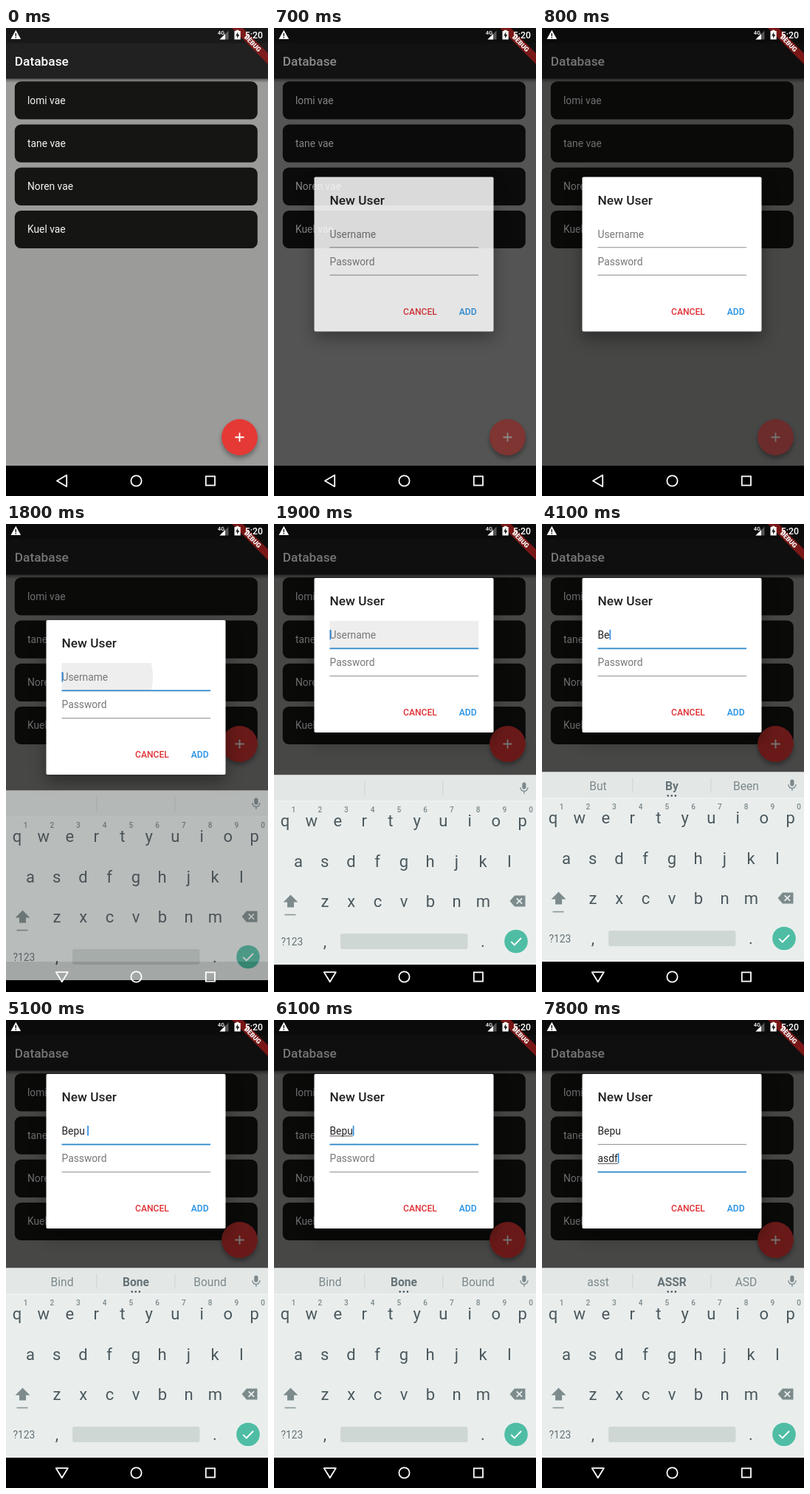
Recreate the animation shown at these times as an HTML page. Size 355 px wide and 633 px high, loop 8000 ms.

```html
<!DOCTYPE html>
<html lang="en">
<head>
<meta charset="utf-8">
<title>Add user dialog</title>
<style>
  html, body { margin: 0; width: 100%; height: 100%; overflow: hidden; background: #000; }
  svg { display: block; width: 100vw; height: 100vh; }
  text { font-family: Roboto, "Noto Sans", sans-serif; font-size: 13.8px; white-space: pre; }
  .mid { text-anchor: middle; }
  .medium { font-weight: 500; }
  .title { font-size: 17.3px; font-weight: 500; }
  .button { font-size: 12.1px; font-weight: 500; }
  .key { font-size: 22px; fill: #4b585d; text-anchor: middle; }
  .digit { font-size: 10px; font-weight: 500; fill: #7c888b; text-anchor: middle; }
  .word { font-size: 15.6px; fill: #7d898c; text-anchor: middle; }
  #fab { filter: drop-shadow(0 4px 3px rgba(0, 0, 0, .35)); }
  #card { filter: drop-shadow(0 9px 11px rgba(0, 0, 0, .38)); }
</style>
</head>
<body>
<svg viewBox="0 0 355 633">
  <defs>
    <linearGradient id="shade" x2="0" y2="1">
      <stop offset="0" stop-opacity=".45"/>
      <stop offset="1" stop-opacity="0"/>
    </linearGradient>
    <clipPath id="fieldClip"><rect x="75.5" y="58" width="201.5" height="38"/></clipPath>
    <clipPath id="fabClip"><circle cx="316.5" cy="553.5" r="24.4"/></clipPath>
  </defs>

  <rect width="355" height="592" fill="#9b9b9a"/>
  <rect y="68" width="355" height="6" fill="url(#shade)"/>
  <g id="list"></g>
  <rect width="355" height="68.5" fill="#212121"/>
  <rect width="355" height="20.5" fill="#191919"/>
  <text class="title" x="11.8" y="51" fill="#fff">Database</text>
  <g id="fab">
    <circle cx="316.5" cy="553.5" r="24.4" fill="#e53935"/>
    <circle id="splash" cx="316.5" cy="553.5" fill="#fff" opacity=".2" clip-path="url(#fabClip)"/>
    <path d="M310.4 553.5h12.2M316.5 547.4v12.2" stroke="#fff" stroke-width="1.8"/>
  </g>

  <rect id="barrier" width="355" height="592" fill-opacity=".54"/>
  <g id="dialog">
    <rect id="card" x="54.5" width="243" height="209" rx="1.8" fill="#fff"/>
    <text class="title" x="75.5" y="37" fill="#212121">New User</text>
    <circle id="ink" cx="125" cy="77" fill="#eee" clip-path="url(#fieldClip)"/>
    <g id="fields"></g>
    <text class="button" x="175" y="186" fill="#e03236">CANCEL</text>
    <text class="button" x="250.8" y="186" fill="#2490e3">ADD</text>
  </g>

  <g transform="translate(355 0) rotate(45)">
    <rect x="-35" y="24.2" width="70" height="10.4" fill="#b71c1c" fill-opacity=".63"/>
    <text class="mid" y="32.4" fill="#fff" style="font-size:8.8px;font-weight:900">DEBUG</text>
  </g>

  <rect y="592" width="355" height="41"/>
  <g id="keyboard">
    <rect y="335.5" width="355" height="256.5" fill="#e9eeed"/>
    <rect y="335.5" width="355" height="35" fill="#e3e8e7"/>
    <path d="M0 370.8h355" stroke="#f1f4f3"/>
    <path d="M122.8 343.5v20M228.8 343.5v20" stroke="#cdd3d2"/>
    <g id="words"></g>
    <g fill="none" stroke="#7d898c" stroke-width="1.4">
      <rect x="337" y="346.2" width="3.8" height="7.6" rx="1.9" fill="#7d898c"/>
      <path d="M333.8 352.3a5.1 5.1 0 0 0 10.2 0M338.9 357.4v3.4"/>
    </g>
    <g id="keys"></g>
    <path d="M22.5 497.5l10 10h-5.5v7h-9v-7h-5.5z" fill="#7d8b8d"/>
    <path d="M14.5 524.5h15" stroke="#8d9a9b" stroke-width="1.7"/>
    <path d="M326 498.5h14.5v15H326l-6.5-7.5z" fill="#7d8b8d"/>
    <path d="M328.7 502.3l7.4 7.4m0-7.4l-7.4 7.4" stroke="#e9eeed" stroke-width="1.7"/>
    <rect x="90" y="550" width="172.5" height="21" rx="3" fill="#cfd7d5"/>
    <circle cx="328" cy="560.5" r="15.8" fill="#4fbda4"/>
    <path d="M321.2 560.8l4.6 4.6 9.2-9.4" fill="none" stroke="#fff" stroke-width="1.9"/>
  </g>

  <g fill="none" stroke="#fff" stroke-width="1.8" stroke-linejoin="round">
    <path id="back"/>
    <circle cx="176.5" cy="612.5" r="7.1"/>
    <rect x="270.8" y="606.4" width="12.2" height="12.2" stroke-linejoin="miter"/>
  </g>

  <g fill="#fff">
    <path d="M13.3 2.8l6.8 12.2H6.5z"/>
    <path d="M13.3 7v4.2M13.3 12.2v1.5" stroke="#191919" stroke-width="1.4"/>
    <text class="medium" x="286.8" y="9" style="font-size:7.5px">4G</text>
    <path d="M301.5 3.5v12h-12z" opacity=".3"/>
    <path d="M297 8v7.5h-7.5z"/>
    <path d="M309.5 4h2.3V2.7h3.6V4h2.3v11.5h-8.2z"/>
    <path d="M314.3 5.5l-3.2 5h2v3.5l3.2-5h-2z" fill="#191919"/>
    <text class="medium" x="323.8" y="14" style="font-size:12.3px">5:20</text>
  </g>
</svg>
<script>
const $ = id => document.getElementById(id);
const LOOP = 8000;
const NAME = "Bepu";
const REST = 201.5;      // dialog top while the keyboard is hidden
const RESIZE = 256;      // height taken by the keyboard

const label = (s, x, y, cls = "", fill = "") =>
  `<text x="${x}" y="${y}" class="${cls}"${fill && ` fill="${fill}"`}>${s}</text>`;

const pen = document.createElement("canvas").getContext("2d");
pen.font = '13.8px Roboto, "Noto Sans", sans-serif';
const widthOf = s => pen.measureText(s).width;

$("list").innerHTML = ["lomi vae", "tane vae", "Noren vae", "Kuel vae"].map((s, i) => {
  const y = 72.3 + i * 58.2;
  return `<rect x="11.8" y="${y}" width="329" height="51.2" rx="8.6" fill="#151514"/>` +
    label(s, 29, y + 30.3, "", "#f4f4f4");
}).join("");

const keyRow = (s, x, y) => [...s].map((c, i) => label(c, x + i * 35.73, y, "key")).join("");
$("keys").innerHTML =
  keyRow("qwertyuiop", 15, 405) +
  keyRow("asdfghjkl", 33, 459.5) +
  keyRow("zxcvbnm", 69, 514) +
  [..."1234567890"].map((c, i) => label(c, 26.5 + i * 35.73, 386, "digit")).join("") +
  label("?123", 24.3, 565.7, "mid", "#657175") +
  label(",", 69, 568, "key") + label(".", 283, 568, "key");

// Each step overrides part of the state from its time on.
const start = {
  splash: 0, dim: 0, ink: 0, focus: -1, caret: 0, under: 0, lift: 0,
  alpha: 0, drop: 0, resized: 0, user: "", pass: "", words: ""
};
const steps = [
  [500, { splash: 12 }],
  [600, { splash: 20, dim: .35 }],
  [700, { splash: 25, dim: .85 }],
  [800, { dim: 1 }],
  [900, { splash: 0 }],
  [1700, { ink: 34, focus: 0, alpha: .25, drop: 29 }],
  [1800, { ink: 74, caret: 1, alpha: .7, drop: 25, lift: 71.5, resized: 1 }],
  [1900, { ink: 160, alpha: 1, drop: 4, lift: 128.5 }],
  [2000, { ink: 0, drop: 0 }],
  [2200, { caret: 0 }],
  [2500, { caret: 1, user: "D", under: 1 }],
  [2600, { words: "Did Day Due" }],
  [3100, { caret: 0 }],
  [3300, { caret: 1, user: "", under: 0 }],
  [3400, { words: "I The This" }],
  [3800, { user: NAME.slice(0, 1) }],
  [3900, { words: "But By Been" }],
  [4100, { user: NAME.slice(0, 2) }],
  [4200, { under: 1, words: "Be Best Been" }],
  [4300, { user: NAME.slice(0, 3) }],
  [4400, { words: "Bed Beep Bell" }],
  [4500, { user: NAME }],
  [4800, { words: "Bind Bone Bound" }],
  [5100, { user: NAME + " ", under: 0 }],
  [5200, { words: "and is was" }],
  [5400, { words: "is and the" }],
  [5700, { caret: 0 }],
  [6000, { caret: 1, user: NAME }],
  [6100, { under: 1, words: "Bind Bone Bound" }],
  [6600, { caret: 0 }],
  [7100, { caret: 1, focus: 1, under: 0 }],
  [7200, { pass: "a", under: 1 }],
  [7300, { words: "a and at" }],
  [7400, { pass: "as" }],
  [7500, { words: "as ask also" }],
  [7600, { pass: "asd" }],
  [7700, { pass: "asdf" }],
  [7800, { words: "asst ASSR ASD" }]
];

function stateAt(t) {
  return Object.assign({}, start, ...steps.filter(s => s[0] <= t).map(s => s[1]));
}

function field(s, i, value, hint) {
  const base = 82 + i * 37.3, line = 95.3 + i * 37.4, on = s.focus === i;
  const end = 75.5 + widthOf(value);
  let out = value ? label(value, 75.5, base, "", "#212121") : label(hint, 75.5, base, "", "#777");
  out += `<path d="M75.5 ${line}H277" stroke="${on ? "#2b85cc" : "#898989"}" stroke-width="${on ? 1.8 : 1}"/>`;
  if (on && s.under && value) out += `<path d="M75.5 ${base + 1.9}H${end}" stroke="#333" stroke-width=".9"/>`;
  if (on && s.caret) out += `<rect x="${end}" y="${base - 12}" width="1.7" height="13.4" fill="#2f8be0"/>`;
  return out;
}

function suggestions(words) {
  if (!words) return "";
  const [left, best, right] = words.split(" ");
  const dots = [170.7, 175.8, 180.9].map(x => `<circle cx="${x}" cy="367.5" r="1.2" fill="#37474f"/>`);
  return label(left, 76, 359.5, "word") +
    `<text class="word" x="176" y="359.5" style="font-weight:700;fill:#657276">${best}</text>` +
    label(right, 276.5, 359.5, "word") + dots.join("");
}

function draw(t) {
  const s = stateAt(t);
  $("splash").setAttribute("r", s.splash);
  $("fab").setAttribute("transform", `translate(0 ${-RESIZE * s.resized})`);
  $("barrier").setAttribute("opacity", s.dim);
  $("dialog").setAttribute("opacity", s.dim);
  $("dialog").setAttribute("transform", `translate(0 ${REST - s.lift})`);
  $("ink").setAttribute("r", s.ink);
  $("fields").innerHTML = field(s, 0, s.user, "Username") + field(s, 1, s.pass, "Password");
  $("keyboard").setAttribute("opacity", s.alpha);
  $("keyboard").setAttribute("transform", `translate(0 ${s.drop})`);
  $("words").innerHTML = suggestions(s.words);
  $("back").setAttribute("d", s.alpha ? "M67.8 606.2h16l-8 13z" : "M82.2 604.8v15.4l-13.2-7.7z");
}

const began = performance.now();
let shown = -1;
function tick() {
  const t = Math.floor(((performance.now() - began) % LOOP) / 100) * 100;
  if (t !== shown) draw(shown = t);
  requestAnimationFrame(tick);
}
tick();
</script>
</body>
</html>
```
